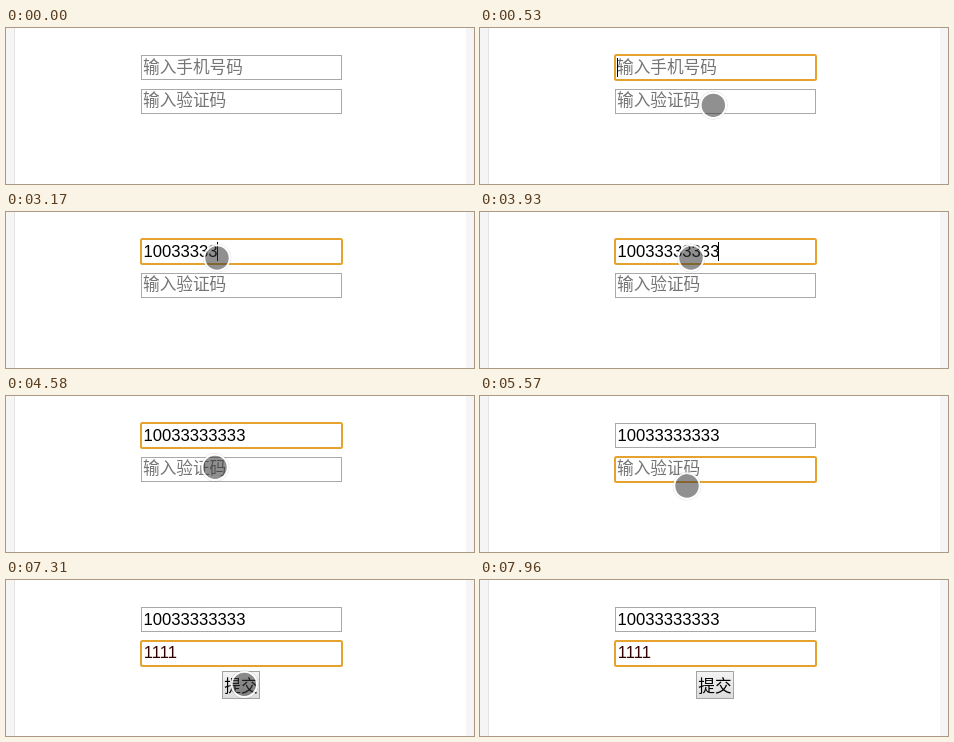
An HTML page for the animation above (8000 ms loop, 468 px wide and 156 px high).

```html
<!DOCTYPE html>
<html lang="zh">
<head>
<meta charset="utf-8">
<style>
  html, body { margin: 0; width: 100%; height: 100%; overflow: hidden; background: #fff; }
  svg { display: block; }
  text { font: 16.667px "Liberation Sans", Arial, "Noto Sans CJK SC", "Noto Sans CJK", sans-serif; font-kerning: none; }
  .hint { fill: #757575; font-family: "Noto Sans CJK SC", "Noto Sans CJK", sans-serif; }
  .box { fill: #fff; stroke: #a9a9a9; }
  #ring { fill: none; stroke: #e5a32e; stroke-width: 2; }
  #code { fill: #300; letter-spacing: -1.25px; }
</style>
</head>
<body>
<svg width="468" height="156" viewBox="0 0 468 156">
  <defs>
    <linearGradient id="face" x2="0" y2="1">
      <stop stop-color="#f4f4f4"/><stop offset="1" stop-color="#dcdcdc"/>
    </linearGradient>
  </defs>
  <rect width="468" height="156" fill="#f5f5f5"/>
  <rect x="8" width="452" height="156" fill="#e4e4e4"/>
  <rect x="9" width="451" height="156" fill="#fff"/>

  <rect class="box" x="135.5" y="27.5" width="200" height="24"/>
  <rect class="box" x="135.5" y="61.5" width="200" height="24"/>
  <rect id="ring" x="135" y="27" width="201" height="25" rx="1.5"/>

  <text class="hint" id="phoneHint" x="137" y="45.3">输入手机号码</text>
  <text class="hint" id="codeHint" x="137" y="78.3">输入验证码</text>
  <text id="phone" x="137.5" y="45"></text>
  <text id="code" x="137.7" y="78"></text>
  <rect id="caret" width="1" height="19"/>

  <g id="button">
    <rect x="216.5" y="91.5" width="37" height="27" fill="url(#face)" stroke="#a3a3a3"/>
    <text x="235" y="112" text-anchor="middle">提交</text>
  </g>

  <g id="pointer">
    <circle r="14" fill="none" stroke="#000" stroke-opacity=".1"/>
    <circle r="12.6" fill="none" stroke="#fff" stroke-width="2.2" stroke-opacity=".9"/>
    <circle r="11.7" fill="#323232" fill-opacity=".54"/>
  </g>
</svg>
<script>
const LOOP = 8000, TICK = 110, BLINK = 500;

// Digits arrive at an even pace, with a pause after each group
const phone = {
  id: "phone", text: "10033333333", focus: 430, y: 0, advance: 9.25,
  keyTime: i => 1190 + 2 * TICK * i + (i > 2 ? 3 * TICK : 0) + (i > 6 ? TICK : 0)
};
const code = {
  id: "code", text: "1111", focus: 5020, y: 34, advance: 8,
  keyTime: i => 6000 + TICK * (i + (i > 1))
};

const moves = [
  { start: 100, steps: 6, from: [278, 140], to: [211, 46] },
  { start: 4370, steps: 3, from: [211, 46], to: [208, 84] },
  { start: 4800, steps: 3, from: [208, 84], to: [207, 90] },
  { start: 7310, steps: 3, from: [207, 90], to: [301, 133] }
];
const POINTER_GONE = 7640;

const el = id => document.getElementById(id);
const show = (id, on) => el(id).setAttribute("visibility", on ? "visible" : "hidden");
const place = (id, x, y) => el(id).setAttribute("transform", `translate(${x} ${y})`);

function drawField(field, t) {
  const typed = [...field.text].filter((_, i) => field.keyTime(i) <= t).length;
  el(field.id).textContent = field.text.slice(0, typed);
  show(field.id + "Hint", !typed);
  return typed;
}

function drawFocus(field, typed, t) {
  show("ring", t >= field.focus);
  place("ring", 0, field.y);
  const lastInput = typed ? field.keyTime(typed - 1) : field.focus;
  show("caret", t >= lastInput && Math.floor((t - lastInput) / BLINK) % 2 === 0);
  place("caret", Math.floor(137 + field.advance * typed), 30 + field.y);
}

function drawPointer(t) {
  const move = moves.findLast(m => m.start <= t);
  show("pointer", move && t < POINTER_GONE);
  if (!move) return;
  const step = Math.floor((t - move.start) / TICK) + 1;
  const p = Math.min(1, step / move.steps);
  place("pointer", ...move.from.map((a, i) => a + (move.to[i] - a) * p));
}

function draw(t) {
  const digits = drawField(phone, t), codeDigits = drawField(code, t);
  if (t < code.focus) drawFocus(phone, digits, t);
  else drawFocus(code, codeDigits, t);
  show("button", codeDigits === code.text.length);
  drawPointer(t);
}

const start = performance.now();
function tick() {
  draw((performance.now() - start) % LOOP);
  requestAnimationFrame(tick);
}
draw(0);
requestAnimationFrame(tick);
</script>
</body>
</html>
```
